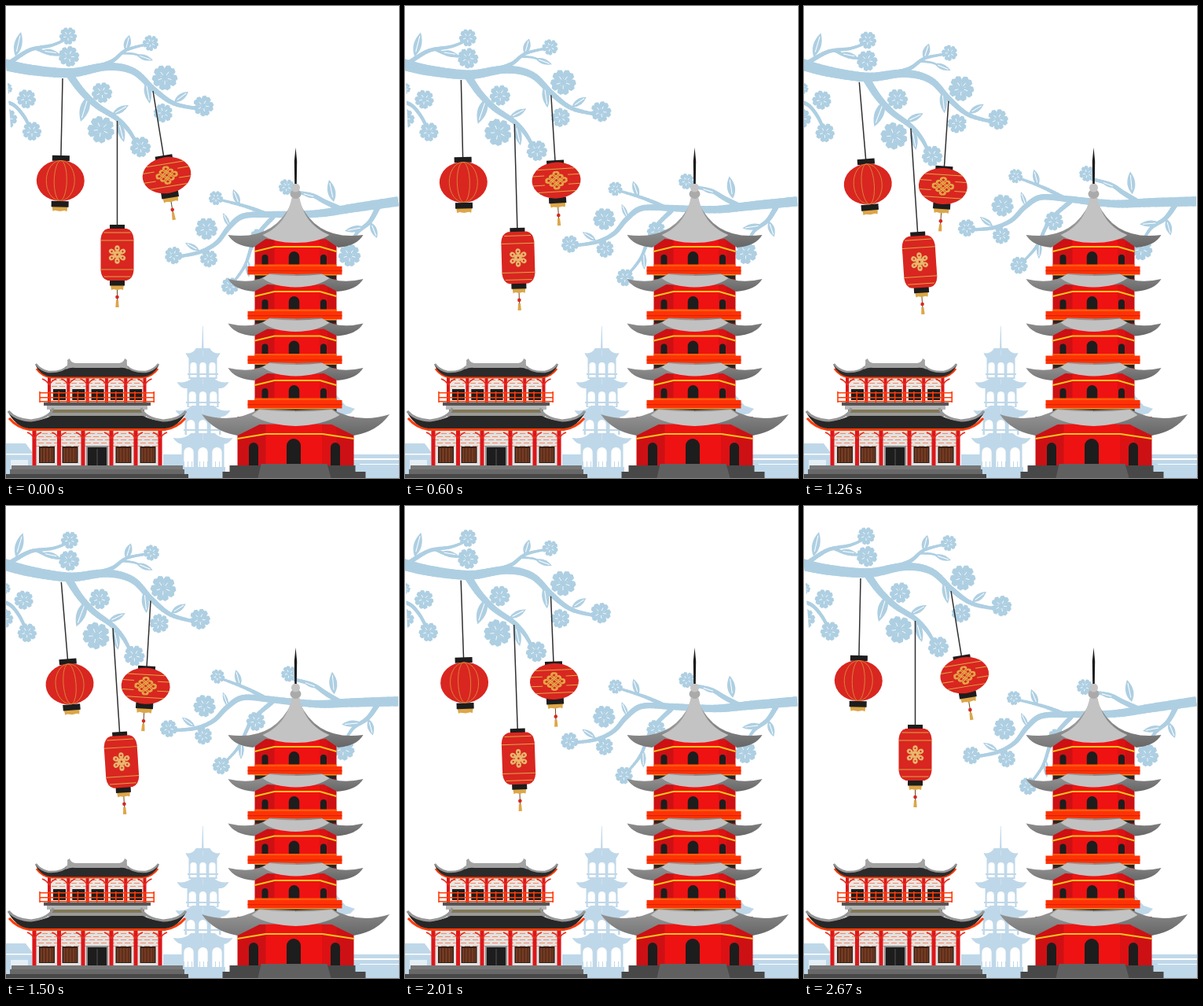
Animation of 500 by 600 pixels, one loop 2700 ms. Source, as an HTML page with a canvas:

```html
<!DOCTYPE html>
<html lang="en">
<head>
<meta charset="utf-8">
<title>Lanterns and pagoda</title>
<style>
html, body { margin: 0; width: 100%; height: 100%; overflow: hidden; background: #fff; }
canvas { display: block; }
</style>
</head>
<body>
<canvas id="stage" width="500" height="600"></canvas>
<script>
const W = 500, H = 600, LOOP = 2700, STEP = 30;
const BLUE = '#aecfe2', PALE = '#bfd8e9', RED = '#ef1212', ORANGE = '#ff3c08',
      YELLOW = '#ffc21c', GOLD = '#dda648', INK = '#1d1d1d';
const stage = document.getElementById('stage').getContext('2d');
let g = stage;

// ---- basic helpers ----
function rect(color, x, y, w, h) {
  g.fillStyle = color;
  g.fillRect(x, y, w, h);
}
function fill(color, d) {
  g.fillStyle = color;
  g.fill(new Path2D(d));
}
function line(color, width, d) {
  g.strokeStyle = color;
  g.lineWidth = width;
  g.stroke(new Path2D(d));
}
function oval(color, x, y, rx, ry = rx) {
  g.fillStyle = color;
  g.beginPath();
  g.ellipse(x, y, rx, ry, 0, 0, 2 * Math.PI);
  g.fill();
}
function arch(color, x, y, w, h) {
  g.fillStyle = color;
  g.beginPath();
  g.roundRect(x - w / 2, y, w, h, [w / 2, w / 2, 0, 0]);
  g.fill();
}
function at(x, y, angle, draw) {
  g.save();
  g.translate(x, y);
  g.rotate(angle);
  draw();
  g.restore();
}
function about(x, y, angle) {
  g.translate(x, y);
  g.rotate(angle);
  g.translate(-x, -y);
}
function mirrored(draw) {
  for (const side of [-1, 1]) {
    g.save();
    g.scale(side, 1);
    draw(side);
    g.restore();
  }
}

// ---- plants ----
function twig(from, to, ...p) {
  const pts = [];
  for (let i = 0; i < p.length; i += 2) pts.push([p[i], p[i + 1]]);
  const n = pts.length - 1, spline = (a, b, c, d, t) =>
    b + t * (c - a + t * (2 * a - 5 * b + 4 * c - d + t * (3 * (b - c) + d - a))) / 2;
  g.strokeStyle = BLUE;
  g.lineCap = 'round';
  let last = pts[0];
  for (let s = 1; s <= n * 8; s++) {
    const i = Math.min(n - 1, Math.floor(s / 8)), t = s / 8 - i;
    const q = [-1, 0, 1, 2].map(k => pts[Math.max(0, Math.min(n, i + k))]);
    const next = [0, 1].map(k => spline(q[0][k], q[1][k], q[2][k], q[3][k], t));
    g.lineWidth = from + (to - from) * s / (n * 8);
    g.beginPath();
    g.moveTo(...last);
    g.lineTo(...next);
    g.stroke();
    last = next;
  }
  g.lineCap = 'butt';
}
function leaf(x0, y0, x1, y1, width = 9) {
  const len = Math.hypot(x1 - x0, y1 - y0);
  at(x0, y0, Math.atan2(y1 - y0, x1 - x0), () => {
    fill(BLUE, `M0 0Q${len * .45} ${width} ${len} 0Q${len * .45} ${-width} 0 0`);
    line('#fff', 1, `M${len * .2} 0H${len * .85}`);
  });
}
function flower(x, y, r, turn = .3) {
  at(x, y, turn, () => {
    for (let i = 0; i < 5; i++) {
      fill(BLUE, `M0 0L${r * .3} ${-r * .22}Q${r * .5} ${-r * .48} ${r * .85} ${-r * .45}
        L${r * 1.02} ${-r * .2}L${r * .92} 0L${r * 1.02} ${r * .2}L${r * .85} ${r * .45}
        Q${r * .5} ${r * .48} ${r * .3} ${r * .22}Z`);
      line('#fff', .8, `M${r * .22} 0H${r * .55}`);
      g.rotate(Math.PI * .4);
    }
    oval(BLUE, 0, 0, r * .24);
  });
}

function leftBranch() {
  twig(15, 4, -8, 73, 30, 81, 82, 85, 128, 77, 162, 83, 188, 106, 214, 124, 247, 131);
  twig(10, 4, 80, 86, 96, 108, 116, 127, 141, 143, 156, 158, 167, 176);
  twig(6, 3, 5, 72, 30, 56, 58, 50, 77, 42);
  twig(4, 3, 38, 54, 56, 61, 74, 62);
  twig(6, 3, 108, 80, 135, 70, 153, 56, 182, 48);
  twig(3, 2, 148, 60, 163, 61, 174, 65);
  twig(5, 4, -4, 121, 10, 126, 22, 139, 31, 155);
  leaf(12, 64, 19, 33, 10);
  leaf(45, 57, 67, 60, 7);
  leaf(152, 57, 157, 37, 9);
  leaf(166, 62, 187, 69, 7);
  leaf(105, 114, 95, 147, 12);
  leaf(135, 138, 156, 126, 8);
  leaf(143, 146, 150, 173, 9);
  leaf(178, 96, 183, 124, 9);
  leaf(214, 122, 232, 109, 8);
  flower(79, 38, 11);
  flower(80, 64, 13, .1);
  flower(184, 47, 10, .5);
  flower(202, 91, 16);
  flower(251, 127, 13, .1);
  flower(200, 136, 12, .6);
  flower(122, 110, 13, .2);
  flower(121, 157, 17, .5);
  flower(171, 179, 13, .2);
  flower(26, 118, 12, .4);
  flower(33, 159, 12);
  flower(2, 143, 12, .1);
  flower(1, 105, 7);
}

function rightBranch() {
  twig(13, 8, 508, 247, 440, 257, 395, 264, 335, 265);
  twig(8, 4, 335, 265, 302, 267, 284, 281, 268, 301, 246, 313, 217, 319);
  twig(6, 3, 335, 266, 306, 255, 271, 246);
  twig(7, 4, 428, 259, 406, 249, 388, 240, 362, 236);
  twig(7, 3, 474, 254, 463, 274, 446, 289, 437, 308);
  twig(6, 3, 340, 268, 317, 295, 304, 330, 287, 354);
  leaf(297, 253, 289, 233, 8);
  leaf(285, 281, 276, 263, 6);
  leaf(246, 311, 228, 301, 7);
  leaf(417, 249, 411, 221, 10);
  leaf(395, 243, 376, 238, 6);
  leaf(464, 275, 472, 295, 8);
  leaf(456, 281, 431, 286, 8);
  leaf(307, 322, 309, 345, 7);
  flower(267, 244, 9);
  flower(255, 283, 14);
  flower(213, 317, 11, .1);
  flower(258, 321, 11, .5);
  flower(285, 356, 11);
  flower(322, 295, 12);
  flower(357, 230, 10, .4);
  flower(437, 317, 14);
}

// ---- lanterns, hanging from (0,0) ----
function caps(top, bottom, half) {
  rect(INK, -half, top, 2 * half, 7);
  fill(GOLD, `M${-half + 1} ${bottom + 6}H${half - 1}L${half - 2} ${bottom + 13}
    L${half - 5} ${bottom + 12}L0 ${bottom + 13}L${5 - half} ${bottom + 12}L${2 - half} ${bottom + 13}Z`);
  rect(INK, -half, bottom, 2 * half, 7.5);
}
function tassel(y) {
  line('#6b4a22', 1, `M0 ${y}V${y + 22}`);
  oval('#d8261f', 0, y + 11, 2.3);
  fill(GOLD, `M-1.5 ${y + 15}H1.5L2.2 ${y + 24}H-2.2Z`);
}
const string = length => line('#303030', 1.5, `M0 0V${length}`);

function roundLantern() {
  string(99);
  caps(98, 156, 11);
  oval('#d92620', 0, 130, 30.5, 26);
  g.strokeStyle = '#d88a3c';
  g.lineWidth = .9;
  for (const rx of [8, 18]) {
    g.beginPath();
    g.ellipse(0, 130, rx, 25.5, 0, 0, 2 * Math.PI);
    g.stroke();
  }
}
function tallLantern() {
  string(133);
  tassel(213);
  caps(132, 202, 9.5);
  fill('#d92620', `M-12 137H12Q20 139 21 150V190Q20 201 12 203H-12Q-20 201 -21 190V150Q-20 139 -12 137`);
  line(GOLD, 1, 'M-17 142H17M-21 152H21M-21 189H21M-17 198H17');
  at(0, 170, Math.PI / 6, () => {
    for (let i = 0; i < 6; i++) {
      oval('#e8b76c', 8, 0, 3.8, 3.2);
      oval('#d92620', 8, 0, 1.1);
      g.rotate(Math.PI / 3);
    }
    oval('#e8b76c', 0, 0, 5);
    oval('#d92620', 0, 0, 1.3);
  });
}
function knotLantern() {
  string(84);
  tassel(142);
  caps(83, 130, 11);
  oval('#d92620', 0, 108.5, 31, 23);
  line(GOLD, 1, 'M-24 94H24M-30 102H-15M15 102H30M-30 114H-15M15 114H30M-24 123H24');
  g.save();
  g.translate(0, 108.5);
  g.scale(1.15, .95);
  g.rotate(Math.PI / 4);
  g.strokeStyle = '#e3a848';
  g.lineWidth = 1.4;
  g.beginPath();
  for (const k of [-6, 0, 6]) {
    g.roundRect(k - 2, -9.5, 4, 19, 2);
    g.roundRect(-9.5, k - 2, 19, 4, 2);
  }
  g.stroke();
  g.restore();
}

// ---- distant skyline ----
function skyline() {
  fill(PALE, 'M250 407H250.6L251.5 438H249Z');
  const tiers = [[437, 22, 18], [474, 33, 20], [510, 35, 23], [545, 38, 27]];
  tiers.forEach(([y, half, wall], i) => {
    const bottom = i < 3 ? tiers[i + 1][0] : H, step = wall * 2 / 3;
    rect(PALE, 250.5 - wall, y + 7, wall * 2, bottom - y - 7);
    for (const k of [-1, 0, 1])
      arch('#fff', 250.5 + k * step, y + 16, step * .68, i < 3 ? 19 : 27);
    at(250.5, y, 0, () => mirrored(() =>
      fill(PALE, `M0 -2H${half * .4}Q${half * .6} 6 ${half} 4Q${half * .88} 11 ${half * .7} 12H0Z`)));
    if (i < 3) rect(PALE, 249 - wall, bottom - 7, wall * 2 + 3, 2);
    else {
      for (let x = 226; x < 277; x += 5) rect(PALE, x, 579, 1, 8);
      rect(PALE, 222, 586, 57, 14);
    }
  });
  fill(PALE, 'M0 556H25L34 568V600H0Z');
  rect('#fff', 0, 569, 34, 1.5);
  rect('#e4eff6', 6, 577, 22, 10);
  fill(PALE, 'M200 570H225V600H200ZM415 488L432 508L444 512L438 518L428 520V600H412Z');
  fill(PALE, 'M438 570H500V600H438Z');
  rect('#fff', 440, 575, 60, 2);
  rect('#fff', 450, 582, 50, 1);
}

// ---- two-storey hall, centred on x = 0 ----
function bricks(left, right, top, bottom, color) {
  for (let y = top, odd = 0; y < bottom; y += 4, odd ^= 1)
    for (let x = left + odd * 5; x < right - 5; x += 10) rect(color, x, y, 7, 1);
}
function column(x, top, bottom, width) {
  rect('#dc171b', x - width / 2, top, width, bottom - top);
  line('#e62c1e', 1.8, `M${x} ${top + 10}Q${x + 3} ${top + 4} ${x + 9} ${top + 2}
    M${x} ${top + 10}Q${x - 3} ${top + 4} ${x - 9} ${top + 2}`);
}
function hall() {
  // lower storey
  rect('#e4e1df', -83, 538, 166, 46);
  bricks(-80, 82, 543, 560, '#f08a68');
  for (const x of [-64, -34.5, 33.5, 64.5]) {
    rect('#2c211c', x - 10, 560, 20, 21);
    rect('#743b22', x - 8.5, 562, 17, 18);
    for (let k = -6; k < 8; k += 4) rect('#482515', x + k, 562, 1, 18);
  }
  rect('#8e8e8e', -14, 559, 28, 25);
  rect(INK, -12, 561, 24, 23);
  rect('#555', -.5, 563, 1, 21);
  for (const x of [-80, -48.5, -18, 18, 49, 80]) column(x, 540, 584, 5);
  rect('#777', -109, 584, 218, 6);
  rect('#686868', -111, 589, 222, 6);
  rect('#484848', -116, 595, 232, 5);
  // upper storey
  rect('#eae6e2', -62, 471, 124, 34);
  bricks(-58, 61, 475, 486, '#f08a68');
  for (let x = -48; x < 60; x += 24.3) rect(INK, x - 8, 487, 16, 14);
  for (let x = -61; x < 65; x += 24.3) column(x, 472, 504, 4);
  for (const y of [491, 497, 502]) rect(ORANGE, -73, y, 146, 1.5);
  for (let x = -73; x <= 73; x += 12.1) rect(ORANGE, x - .8, 490, 1.6, 14);
  rect('#555', -68, 504, 136, 4);
  rect('#b5b5b5', -64, 508, 128, 5);
  rect('#807955', -60, 513, 120, 4);
  rect('#999', -62, 517, 124, 5);
  mirrored(() => {
    line(ORANGE, 3, 'M0 538.5H86Q102 536 112 524');
    fill('#272727', 'M0 521H58Q75 529 92 527Q106 524 114 515Q104 535 87 537H0Z');
    line('#969696', 3, 'M56 511Q60 524 84 527Q104 526 113 515');
    line(ORANGE, 3, 'M0 472H58Q70 471 77 461');
    fill('#2b2b2b', 'M0 459H37Q48 466 62 465Q72 463 79 455Q73 470 58 471.5H0Z');
    line('#969696', 2.5, 'M38 458Q45 466 62 465Q72 463 78 455');
    fill('#a3a3a3', 'M0 454H28Q34 453 35 448L38 450Q37 456 40 462Q34 459 28 460H0Z');
  });
}

// ---- large pagoda, centred on x = 0 ----
function walls(half, left, right, top, bottom, bend) {
  rect('#cd1014', -half, top, half * 2, bottom - top);
  rect(RED, -left, top, left + right, bottom - top);
  rect('#dc1114', right, top, (half - right) * .45, bottom - top);
  line(YELLOW, 2, `M${-half} ${bend + 6}L${-left} ${bend}H${right}L${half} ${bend + 6}`);
}
function wing(side, top, bottom, d) {
  const shade = g.createLinearGradient(0, top, 0, bottom);
  shade.addColorStop(0, side < 0 ? '#9a9a9a' : '#8c8c8c');
  shade.addColorStop(1, side < 0 ? '#777' : '#666');
  fill(shade, d);
}
function storey(y) {
  walls(52, 27, 31, y, y + 43, y + 16);
  arch(INK, -2, y + 22, 13.5, 17);
  for (const x of [-39, 35.5]) arch(INK, x, y + 26, 8, 13);
  rect('#252525', -52, y + 48, 104, 10);
  rect('#ff3205', -61, y + 41, 120, 10.5);
  rect('#ff5a0a', -52, y + 38.5, 104, 2.5);
  rect('#d92505', -61, y + 46, 120, 1.2);
  rect('#ff8b1c', -52, y + 51, 104, 1.5);
}
function pagoda() {
  storey(290);
  for (const y of [347, 403.5, 460]) {
    storey(y);
    at(0, y, 0, () => {
      mirrored(side => wing(side, -8, 16, 'M0 -6L33 -7Q52 8 86 0Q78 14 53 16L36 7L0 9Z'));
      fill('#c1c1c1', 'M-42 -1L-34 -6Q0 -2 34 -6L43 -1Q28 10 0 10.5Q-28 10 -42 -1');
    });
  }
  mirrored(side => wing(side, 275, 307, 'M0 246L5 250Q28 299 86 291Q78 305 54 307L38 296L0 300Z'));
  fill('#c3c3c3', 'M-5 244C-10 268 -22 282 -42 291Q-28 301 0 301Q28 301 43 291C22 282 10 268 5 244Z');
  oval('#aaa', 0, 239, 7, 6);
  oval('#c4c4c4', 0, 231, 5.5);
  fill(INK, 'M0 180L1.7 197L1.3 226H-1.3L-1.7 197Z');

  walls(74, 38, 34, 522, 584, 544);
  arch(INK, -2.5, 550, 18, 34);
  for (const x of [-53.5, 50.5]) arch(INK, x, 555, 12, 29);
  at(0, 521, 0, () => {
    mirrored(side => wing(side, -9, 25, 'M0 -7L46 -9Q80 11 119.5 -2Q104 20 74 25L46 11L0 10Z'));
    fill('#c3c3c3', 'M-56 -1L-46 -8Q0 -3 46 -8L56 -1Q34 12 0 13Q-34 12 -56 -1');
  });
  fill('#484848', 'M-84 584H76V592H89V600H-93V592H-84Z');
  fill('#606060', 'M-44 582H40L45 600H-48Z');
}

const buildings = document.createElement('canvas');
buildings.width = W;
buildings.height = H;
g = buildings.getContext('2d');
at(116, 0, 0, hall);
at(368.5, 0, 0, pagoda);
g = stage;

// ---- motion ----
const LEFT_SWING = .07, RIGHT_SWING = .122, RAD = Math.PI / 180;
const LANTERNS = [
  { x: 72, y: 92, from: 1.2, to: -4.9, draw: roundLantern },
  { x: 141.5, y: 146, from: 0, to: -3.8, draw: tallLantern },
  { x: 187, y: 108, from: -9.3, to: 4.2, linear: .4, draw: knotLantern },
];

// Artwork is cut at the page edge in its far pose, then swung about the pivot.
function swing(px, py, range, p, draw) {
  g.save();
  about(px, py, range * (p - 1));
  g.beginPath();
  g.rect(0, -50, 499, 700);
  g.clip();
  about(px, py, range);
  draw();
  g.restore();
}
function render(time) {
  const phase = time / LOOP;
  const ease = (1 - Math.cos(2 * Math.PI * phase)) / 2;
  const ramp = 1 - Math.abs(1 - 2 * phase);
  rect('#fff', 0, 0, W, H);
  skyline();
  swing(499, 249, RIGHT_SWING, ease, rightBranch);
  g.drawImage(buildings, 0, 0);
  swing(2, 70, LEFT_SWING, ease, leftBranch);
  for (const { x, y, from, to, linear = 0, draw } of LANTERNS) {
    const a = LEFT_SWING * ease, dx = x - 2, dy = y - 70;
    const p = ease + (ramp - ease) * linear;
    at(2 + dx * Math.cos(a) - dy * Math.sin(a), 70 + dx * Math.sin(a) + dy * Math.cos(a),
      (from + (to - from) * p) * RAD, draw);
  }
}
const start = performance.now();
function tick() {
  const time = (performance.now() - start) % LOOP;
  render(Math.floor(time / STEP) * STEP);
  requestAnimationFrame(tick);
}
tick();
</script>
</body>
</html>
```
